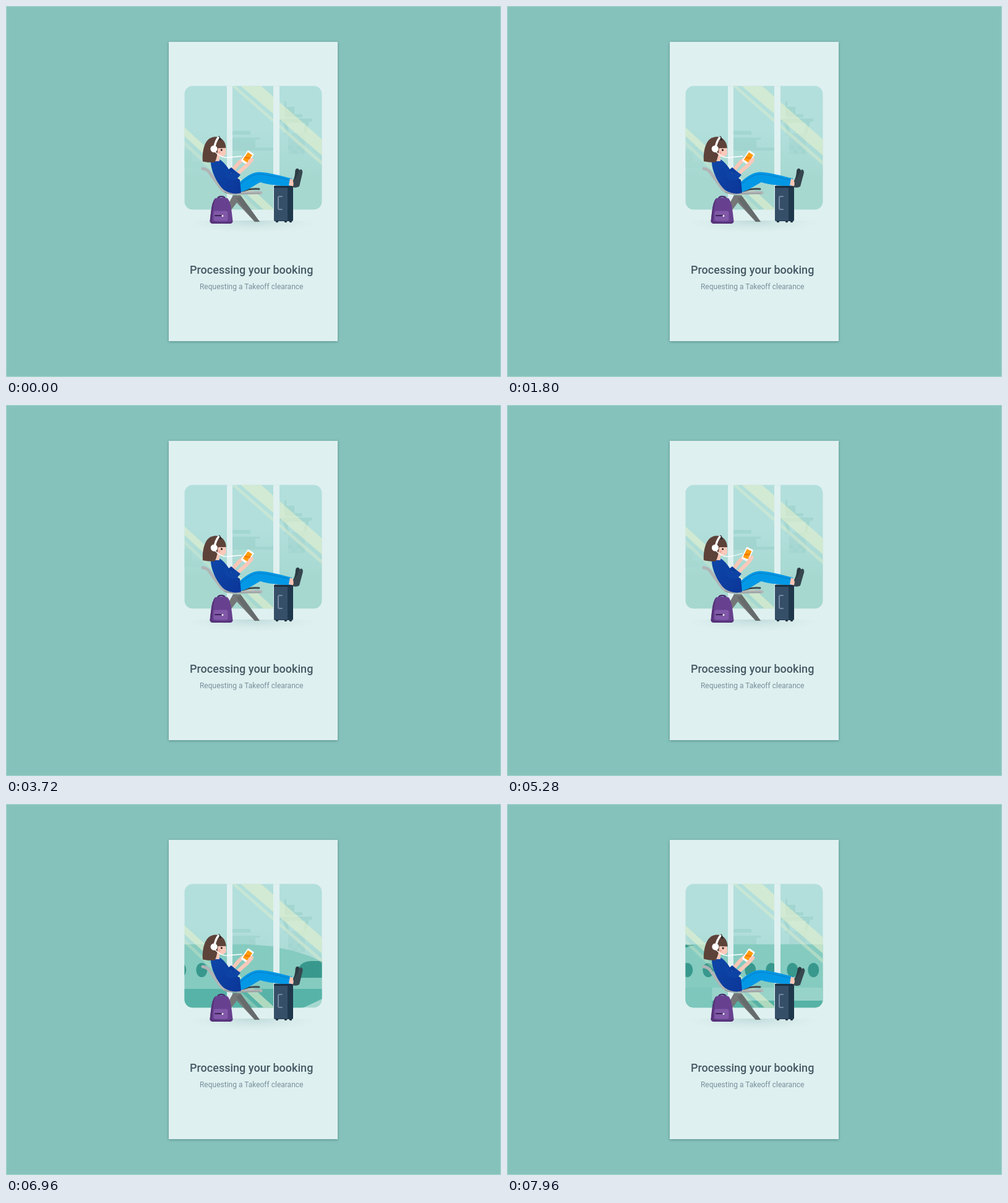
These frames come from a looping animation (800x600 px, 8 s). An HTML page:

```html
<!DOCTYPE html>
<html lang="en">
<head>
<meta charset="utf-8">
<title>Processing your booking</title>
<style>
  html, body { margin: 0; width: 100%; height: 100%; overflow: hidden; background: #86c2bc; }
  svg { display: block; width: 800px; height: 600px; }
  text { font-family: Roboto, sans-serif; text-anchor: middle; }
  .card { filter: drop-shadow(0 1.5px 2px rgba(30, 80, 80, .45)); }
  .line { fill: none; stroke-linecap: round; stroke-linejoin: round; }
</style>
</head>
<body>
<svg viewBox="0 0 800 600">
  <defs>
    <clipPath id="pane"><rect x="288.5" y="129.3" width="222" height="200" rx="13"/></clipPath>
    <linearGradient id="sky" x1="0" y1="0" x2="0" y2="1">
      <stop offset=".35" stop-color="#b2dfdc"/>
      <stop offset=".75" stop-color="#a6d8d0"/>
    </linearGradient>
    <linearGradient id="sweater" x1="0" y1="0" x2="1" y2="1">
      <stop offset="0" stop-color="#0d47a8"/>
      <stop offset="1" stop-color="#0b3699"/>
    </linearGradient>
    <radialGradient id="floor">
      <stop offset="0" stop-color="#b9d6d6" stop-opacity=".85"/>
      <stop offset="1" stop-color="#cfe4e4" stop-opacity="0"/>
    </radialGradient>
    <clipPath id="ground"><rect x="290" y="347" width="220" height="24"/></clipPath>
  </defs>

  <rect width="800" height="600" fill="#86c2bc"/>
  <rect x=".5" y=".5" width="799" height="599" fill="none" stroke="#fff" stroke-opacity=".3"/>
  <rect class="card" x="263" y="58" width="273" height="484" fill="#dff0f0"/>

  <g clip-path="url(#pane)">
    <rect x="288" y="129" width="223" height="201" fill="url(#sky)"/>
    <g fill="#9fd4ce" opacity=".8">
      <path d="M366 202H395V208H366ZM366 213H410V216H403V229H432V234H366Z"/>
      <path d="M288 233H301V252H318V262H288Z" opacity=".4"/>
      <path d="M450 154H453V163H466V175H479V180H450Z"/>
      <path d="M443 182H495V187H490L485 206H480L484 189H454L458 206H453L447 187H443Z"/>
      <path d="M449 206H490V209H483V240H456V209H449Z" opacity=".5"/>
      <path d="M456 226H463V232H456ZM470 226H477V232H470ZM463 232H470V238H463ZM477 232H483V238H477Z"/>
    </g>

    <g id="plane">
      <path d="M-900 227H385C440 228 500 243 530 268C545 280 545 295 530 305C505 322 470 330 440 345H-900Z" fill="#85cbc0"/>
      <path d="M240 299H535Q505 322 440 345H240Z" fill="#57b3a8"/>
      <path d="M50 297H240V318H50Z" fill="#98d3ca"/>
      <path d="M50 318H240V345H50Z" fill="#55b2a5"/>
      <path d="M-900 297H50V345H-900Z" fill="#7dc7bd"/>
      <path d="M21 228L-100 226V266Z" fill="#35988c"/>
      <path d="M473 281Q468 278 470 269Q476 255 492 254H515Q530 265 535 281Z" fill="#38988d"/>
      <g id="portholes" fill="#38988d"></g>
    </g>

    <g fill="#e6f0cd" opacity=".62">
      <path d="M379 129H412L511 216V242Z"/>
      <path d="M364 129H371L511 251V258Z" opacity=".7"/>
      <path d="M288 196L435 330H417L288 210Z"/>
      <path d="M288 218L408 330H400L288 225Z" opacity=".5"/>
    </g>
    <path d="M357 129H366V330H357ZM432 129H442V330H432Z" fill="#dff0f0"/>
  </g>

  <ellipse cx="398" cy="347" rx="104" ry="20" fill="url(#floor)" clip-path="url(#ground)"/>

  <path d="M367 306H379L410 349H402L373 318L352 346H345Z" fill="#747677"/>
  <path d="M372 311L380 308L410 349H402Z" fill="#666b6c"/>

  <path class="line" d="M342 313Q342 308 348 308T354 313" stroke="#4a2b70" stroke-width="2.5"/>
  <path d="M338 311Q348 309 358 311Q363 316 365 335L366.500 348Q366 352 361 352H335Q330 352 329.500 348L331 335Q333 316 338 311Z" fill="#67418f"/>
  <path d="M338 311Q333 316 331 335L329.500 348Q330 352 335 352H361Q366 352 366.500 348Q350 351 333 348Q334 328 338 311Z" fill="#563279"/>
  <rect x="335.500" y="331.500" width="23" height="16" rx="3" fill="#8058a7"/>
  <path class="line" d="M338 339H350" stroke="#3b2359" stroke-width="2"/>
  <circle cx="350" cy="339.500" r="1.400" fill="#fff"/>

  <g fill="#26333f"><circle cx="438" cy="348" r="2.300"/><circle cx="452" cy="348" r="2.300"/><circle cx="460" cy="348" r="2.300"/></g>
  <rect x="433" y="290.500" width="31" height="57.500" rx="2" fill="#20384c"/>
  <path d="M433 294H455V347H435Q433 347 433 345Z" fill="#364f69"/>
  <path d="M433 292.500H464" stroke="#1c2f42" stroke-width="3"/>
  <path class="line" d="M446 308H442Q440 308 440 310V327Q440 329 442 329H446" stroke="#7488a0" stroke-width="2"/>

  <path class="line" d="M318 263Q326 264 330 271L347 294Q352 301 362 302L412 302" stroke="#b1b4b5" stroke-width="5"/>
  <path class="line" d="M353 301Q362 305 378 304L410 303" stroke="#989d9f" stroke-width="1.500"/>
  <path class="line" d="M382 299Q395 295 409 296" stroke="#3f4a50" stroke-width="3"/>

  <path d="M374 288C387 276 397 269 409 268.500C425 269 445 275 462 279L461 291C442 291 424 289 411 285C399 291 391 299 374 302Z" fill="#0398e6"/>
  <path class="line" d="M379 288Q396 272 409 272T459 282" stroke="#0684cf" stroke-width="1.500"/>
  <path d="M459 279L468 283L466 292L457 290Z" fill="#f8c6b6"/>
  <g id="feet" fill="#37474f">
    <path d="M464 283Q468 276 468.500 267Q469 263 472.500 263Q476 264 475 269L471 284Z" fill="#2c3b43"/>
    <path d="M464 283Q470 279 474 268Q476 264 478.500 265Q481 267 480 271L474 292Q470 295 463 293Q466 288 464 283Z"/>
  </g>

  <path d="M331 252C334 247 343 246 348 250C354 255 358 260 361 266L365 273L378 281L380 302C371 305 361 303 353 298C343 290 331 268 331 252Z" fill="url(#sweater)"/>

  <g id="head">
    <path d="M333 228H355L356 236Q357 241 352 243L345 244V251H334Z" fill="#fac9ba"/>
    <path d="M318 251C317 237 321 217 332 213C344 208 356 216 356 230H343C342 239 341 247 337 253Q326 253 318 251Z" fill="#5d4239"/>
    <path class="line" d="M345 212L347 216" stroke="#292526" stroke-width="3"/>
    <path class="line" d="M337 230Q339 219 344 213" stroke="#fff" stroke-width="3.400"/>
    <circle cx="336.500" cy="231" r="5.600" fill="#fff"/>
    <circle cx="348.700" cy="233" r="1.600" fill="#2c2525"/>
    <circle cx="345" cy="237" r="2" fill="#f4aaa0"/>
  </g>

  <path class="line" id="cord" stroke="#fff" stroke-width="1.300"/>
  <g id="arms">
    <path class="line" d="M366 266L377 253L384 247" stroke="#f8c6b6" stroke-width="6"/>
    <g id="phone">
      <rect x="-6" y="-10.500" width="12" height="21" rx="1.800" fill="#fff"/>
      <rect x="-4.300" y="-7.500" width="8.600" height="14.500" fill="#ff9a0a"/>
      <path d="M-4.300 1L4.300 -3V0L-4.300 4Z" fill="#f57c00"/>
    </g>
    <path class="line" d="M373 272L390 257L397 249" stroke="#fac9ba" stroke-width="6"/>
    <path class="line" d="M393 250L398 247" stroke="#fac9ba" stroke-width="3"/>
  </g>
  <path d="M359 265L364 261L371 267L366 273Z" fill="#0b3d9d"/>
  <path d="M350 261Q358 261 361 273L371 267L379 273L373 280Q365 284 356 278Z" fill="#0d43a5"/>

  <text x="396.700" y="433" font-size="18" font-weight="500" fill="#455a64">Processing your booking</text>
  <text x="396.700" y="457.500" font-size="12" fill="#78909c">Requesting a Takeoff clearance</text>
</svg>
<script>
  const LOOP = 8000, BEAT = 640;
  const byId = id => document.getElementById(id);
  const move = (id, value) => byId(id).setAttribute('transform', value);

  byId('portholes').innerHTML = Array.from({ length: 24 }, (_, i) =>
    `<ellipse cx="${316 - 34 * i}" cy="268.500" rx="9" ry="11.500"/>`).join('');

  // Smooth rise and fall while the phone is lifted.
  function lift(t) {
    const u = (t - 4800) / 960;
    return u > 0 && u < 1 ? Math.sin(Math.PI * u) ** 2 : 0;
  }

  function draw(t) {
    const sway = Math.cos(2 * Math.PI * t / BEAT);
    const raise = lift(t);
    move('head', `rotate(${-1.5 * sway} 340 250)`);
    move('feet', `rotate(${-3 * sway} 465 289)`);
    move('arms', `rotate(${-4 * raise} 366 270)`);
    move('phone', `translate(390.300 ${245 - 2 * raise}) rotate(${34 - 5 * raise})`);
    byId('cord').setAttribute('d',
      `M338 236Q348 246 358 245T${381 - raise} ${243 - 3 * raise}`);
    move('plane', `translate(${0.281 * (t - 6960)} 0)`);
    byId('plane').style.display = t < 5920 ? 'none' : '';
  }

  function tick() {
    draw(performance.now() % LOOP);
    requestAnimationFrame(tick);
  }
  tick();
</script>
</body>
</html>
```
